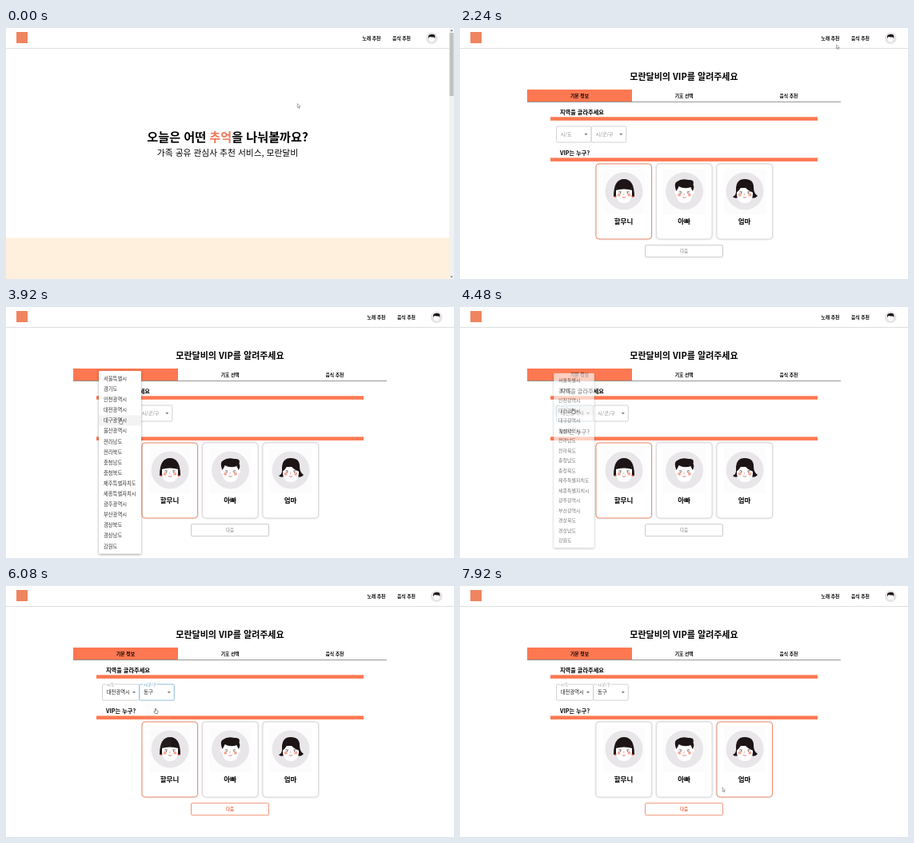
An HTML page for the animation above (8000 ms loop, 560 by 314 pixels).

```html
<!DOCTYPE html>
<html lang="ko">
<head>
<meta charset="utf-8">
<style>
html, body { margin: 0; width: 100%; height: 100%; overflow: hidden; background: #fff; }
svg { display: block; width: 100vw; height: 100vh; font-family: "Noto Sans CJK KR", "Noto Sans KR", "Noto Sans CJK", "Noto Sans CJK JP", sans-serif; }
.paper { filter: drop-shadow(0 1.5px 1.6px rgba(0,0,0,.38)); }
.card { filter: drop-shadow(0 .6px .8px rgba(0,0,0,.18)); }
</style>
</head>
<body>
<svg id="stage" viewBox="0 0 560 314"></svg>
<script>
const ORANGE = '#ff7851', BLUE = '#75abc9', GREY = '#c8c8c8';
const LOOP = 8000;
const PAGE = 2000, OPEN1 = 3090, PICK1 = 4430, OPEN2 = 5085, PICK2 = 5900, PICK_CARD = 6880;

const regions = ['서울특별시', '경기도', '인천광역시', '대전광역시', '대구광역시', '울산광역시',
  '전라남도', '전라북도', '충청남도', '충청북도', '제주특별자치도', '세종특별자치시',
  '광주광역시', '부산광역시', '경상북도', '경상남도', '강원도'];
const districts = ['동구', '중구', '서구', '유성구', '대덕구'];

// Cursor hot spot: time, x, y
const path = [[0, 364.3, 94.5], [160, 364.3, 94.5], [880, 481, 34], [1200, 498, 12], [1840, 499, 11],
  [2120, 499, 11], [2680, 262, 92], [3040, 149, 132], [3300, 149, 132], [3800, 143, 140],
  [3980, 143, 140], [4300, 141, 127], [4500, 141, 127], [4960, 186, 130], [5220, 186, 130],
  [5640, 187, 153], [6120, 187, 153], [6720, 349, 214], [7000, 349, 214], [7640, 328, 252]];

const rect = (x, y, w, h, fill, more = '') =>
  `<rect x="${x}" y="${y}" width="${w}" height="${h}" fill="${fill}" ${more}/>`;
const circle = (x, y, r, fill, more = '') => `<circle cx="${x}" cy="${y}" r="${r}" fill="${fill}" ${more}/>`;
const shape = (d, fill, more = '') => `<path d="${d}" fill="${fill}" ${more}/>`;
const line = (d, color, w) => shape(d, 'none', `stroke="${color}" stroke-width="${w}" stroke-linecap="round"`);
// Text placed by the middle height of its glyphs
const text = (x, y, size, str, more = '') =>
  `<text x="${x}" y="${(y + size * .38).toFixed(2)}" font-size="${size}" ${more}>${str}</text>`;
const mid = 'text-anchor="middle" ', bold = 'font-weight="700" ';

const hair = '#1d1416';
const features =
  line('M-6.5 1q1.5-1.3 3 0M3.5 1q1.5-1.3 3 0', '#2b2020', .6) +
  circle(-4.5, 2.4, .6, '#2b2020') + circle(4.5, 2.4, .6, '#2b2020') +
  circle(-6.3, 4.8, 2, '#f6a899') + circle(6.3, 4.8, 2, '#f6a899') +
  line('M0 2.5l-.8 2.4h1', '#d88', .5) + line('M-1.8 7.8q1.8 1.4 3.6 0', '#d0433f', .7);
const head = shape('M-10-4h20v9q-1 10-10 10T-10 5z', '#fff');

const faces = [
  shape('M-13 7Q-13-15 0-15T13 7z', hair) + head +
  shape('M-10.5-1Q-9-12 0-12T10.5-1Q0-4-10.5-1z', hair) + features +
  circle(-11, 7, 1.1, '#e04a3c') + circle(11, 7, 1.1, '#e04a3c'),

  circle(-10, 2, 2.4, '#fff') + circle(10, 2, 2.4, '#fff') + head +
  shape('M-10 0Q-14-10-9-12Q-4-16 5-14Q13-15 11-8Q13-4 10 0L8-5Q0-2-7-6Q-8-3-10 0z', hair) + features,

  shape('M-15 7Q-10 5-11-2Q-11-15 0-15Q11-15 11-5Q11 3 16 6Q13 10 8 8H-8Q-13 10-15 7z', hair) + head +
  shape('M-10.5 2Q-12-12-2-14Q11-14 10.5 2Q2-1-3-9Q-5-2-10.5 2z', hair) + features
];

const avatar = circle(0, 0, 7.3, '#e6e5e6') +
  shape('M-3.5-1h7v2.5q-.5 3.3-3.5 3.3t-3.5-3.3z', '#fff') +
  shape('M-4 .3Q-4.8-3.6-2.6-4.3Q0-5.6 3-4.6Q4.8-3.4 3.8.3L2.8-1.6Q0-.8-2.6-2z', hair);

const card = (name, i) => {
  const x = 170 + i * 75.5, cx = x + 35;
  return rect(x, 170, 69.5, 94, '#fff', `rx="4" class="card" id="card${i}" stroke-width=".9"`) +
    rect(x + 9, 177, 52, 56, '#fdfcfd') + circle(cx, 204, 23.5, '#e8e6e9') +
    `<g transform="translate(${cx} 204)">${faces[i]}</g>` +
    text(cx - .5, 242, 8.5, name, mid + bold);
};

const select = id => `<g id="${id}">` +
  rect(0, 123, 43.5, 20, '#fff', 'rx="1.5" stroke-width=".8" class="frame"') +
  rect(4.5, 122, 10, 2, '#fff', 'class="notch"') +
  `<g class="label">${text(0, 0, 6.2, id === 'sel1' ? '시/도' : '시/군/구')}</g>` +
  `<text class="value" x="5.3" y="135" font-size="6.3" fill="#222"></text>` +
  `<path class="caret" d="M-2-1h4l-2 2.2z" fill="#777"/></g>`;

const menu = (id, x, y, w, step, items) => `<g id="${id}">` +
  rect(x, y, w, items.length * step + 6, '#fff', 'rx="1.3" class="paper"') +
  rect(x, 0, w, step, '#f3f3f3', 'class="hover"') +
  items.map((s, i) => text(x + 6, y + 3 + step * (i + .5), 6.3, s, 'fill="#333"')).join('') + '</g>';

const tabs = ['기본 정보', '기호 선택', '음식 추천'].map((s, i) =>
  text(149.5 + i * 130.7, 84.5, 5.8, s, mid + bold)).join('');

const stage = document.getElementById('stage');
stage.innerHTML =
  rect(0, 0, 560, 314, '#fff') +
  `<g id="home">` +
  rect(0, 262.5, 554, 51.5, '#fef0dd') +
  text(277, 136.5, 15.13, `오늘은 어떤 <tspan fill="#f0795a">추억</tspan>을 나눠볼까요?`, mid + bold) +
  text(277, 156.3, 10.76, '가족 공유 관심사 추천 서비스, 모란달비', mid) +
  rect(554, 0, 6, 314, '#f1f1f1') + rect(554.5, 6, 5, 79, '#c1c1c1') +
  shape('M555.5 4h3l-1.5-2z', '#666') + shape('M555.5 310.5h3l-1.5 2z', '#666') + `</g>` +
  `<g id="form">` +
  text(280, 60.5, 11, '모란달비의 VIP를 알려주세요', mid + bold) +
  rect(84, 77, 131, 15.5, ORANGE) + rect(84, 92, 392, .9, '#8d8d8d') + tabs +
  text(125, 105, 7.2, '지역을 골라주세요', bold) + rect(113, 111.3, 334, 4.5, ORANGE) +
  text(125, 156, 7.2, 'VIP는 누구?', bold) + rect(113, 162.4, 334, 4.5, ORANGE) +
  select('sel1') + select('sel2') +
  ['할무니', '아빠', '엄마'].map(card).join('') +
  rect(231.5, 271.7, 97, 15, '#fff', 'rx="1.2" stroke-width=".9" id="next"') +
  text(280, 279.3, 5.5, '다음', mid + bold + 'id="nextText"') +
  menu('menu1', 116, 80, 53, 13.1, regions) + menu('menu2', 167, 143, 43.5, 13, districts) + `</g>` +
  rect(0, 25, 560, .9, '#dcdcdc', 'id="rule"') +
  rect(13, 5, 14, 14, '#f0845f') +
  `<g id="nav">` + text(451.5, 12.5, 5.8, '노래 추천', bold) +
  text(489, 12.5, 5.8, '음식 추천', bold + 'id="food"') +
  `<g transform="translate(538.2 12.8)">${avatar}</g></g>` +
  `<g id="cursor">` +
  shape('M0 0v5.2l1.2-1.1.9 1.9.8-.4-.9-1.8h1.6z', '#fff', 'id="arrow" stroke="#333" stroke-width=".4"') +
  shape('M-.6.4Q0-.4.6.4V2.6l2 .5q.6.3.4 1.3l-.5 2.1h-3L-2.2 4.2q.3-.8 1.6 0z', '#fff',
    'id="hand" stroke="#222" stroke-width=".5"') + `</g>`;

const el = id => document.getElementById(id);
const put = (node, attrs) => { for (const k in attrs) node.setAttribute(k, attrs[k]); };
const show = (node, on) => { node.style.display = on ? '' : 'none'; };
const clamp = v => Math.max(0, Math.min(1, v));
const ease = v => v * v * (3 - 2 * v);

function cursorAt(t) {
  const i = path.findIndex(p => p[0] > t);
  if (i < 0) return path[path.length - 1].slice(1);
  const [t0, x0, y0] = path[i - 1], [t1, x1, y1] = path[i];
  const k = ease((t - t0) / (t1 - t0));
  return [x0 + (x1 - x0) * k, y0 + (y1 - y0) * k];
}

function drawSelect(id, x, w, t, opened, picked, blurred, value) {
  const g = el(id), q = c => g.querySelector('.' + c);
  const focus = t >= opened && t < blurred;
  const k = ease(clamp((t - opened + 10) / 180));
  put(g, { transform: `translate(${x} 0)` });
  put(q('frame'), { width: w, stroke: focus ? BLUE : GREY });
  put(q('notch'), { width: (id === 'sel1' ? 10 : 17) * k });
  put(q('label'), {
    transform: `translate(5.3 ${133 - 10 * k}) scale(${1 - .3 * k})`,
    fill: focus ? '#4a94bd' : '#8c8c8c'
  });
  q('value').textContent = t >= picked ? value : '';
  const flip = t >= opened && t < picked ? -1 : 1;
  put(q('caret'), { transform: `translate(${w - 6.5} 133) scale(1 ${flip})` });
}

function drawMenu(id, t, opened, picked, cx, top, step, count, mouse) {
  const g = el(id);
  const left = 1 - clamp((t - opened) / 280);
  const out = 1 - clamp((t - picked) / 200);
  const alpha = t < opened ? 0 : (1 - left ** 3) * out ** 1.5;
  const grow = .75 + .25 * (1 - left ** 4) * (.3 + .7 * out);
  show(g, alpha > 0);
  put(g, {
    opacity: alpha,
    transform: `translate(${cx} 143) scale(${grow}) translate(${-cx} -143)`
  });
  const row = Math.floor((mouse[1] - top - 3) / step);
  const over = g.querySelector('.hover');
  show(over, row >= 0 && row < count && t > opened + 250);
  put(over, { y: top + 3 + row * step });
  return alpha > 0;
}

function draw(t) {
  const home = t < PAGE, mouse = cursorAt(t), [x, y] = mouse;
  const shift = home ? -6 : 0;
  show(el('home'), home);
  show(el('form'), !home);
  put(el('nav'), { transform: `translate(${shift} 0)` });
  put(el('rule'), { width: home ? 554 : 560 });

  const onFood = x > 489 + shift && x < 512 + shift && y > 8 && y < 18;
  put(el('food'), { fill: onFood ? '#f0683f' : '#000' });

  const wide = t >= PICK1 ? 2.5 : 0;
  drawSelect('sel1', 120.5, 43.5 + wide, t, OPEN1, PICK1, OPEN2, '대전광역시');
  drawSelect('sel2', 164.3 + wide, 43.5, t, OPEN2, PICK2, PICK_CARD, '동구');
  const menu1 = drawMenu('menu1', t, OPEN1, PICK1, 142.5, 80, 13.1, regions.length, mouse);
  const menu2 = drawMenu('menu2', t, OPEN2, PICK2, 188.5, 143, 13, districts.length, mouse);

  const chosen = t < PICK_CARD ? 0 : 2;
  for (let i = 0; i < 3; i++) put(el('card' + i), { stroke: i === chosen ? '#ee8562' : '#d9d7dc' });
  const ready = t >= PICK2;
  put(el('next'), { stroke: ready ? '#f08c6b' : '#c4c4c4' });
  put(el('nextText'), { fill: ready ? '#e8673f' : '#a5a5a5' });

  const onSelect = !home && y > 123 && y < 143 && x > 120 && x < 210;
  const hand = onFood || onSelect || menu1 || menu2;
  show(el('hand'), hand);
  show(el('arrow'), !hand);
  put(el('cursor'), { transform: `translate(${x.toFixed(2)} ${y.toFixed(2)})` });
}

const start = performance.now();
function tick() {
  draw((performance.now() - start) % LOOP);
  requestAnimationFrame(tick);
}
tick();
</script>
</body>
</html>
```
